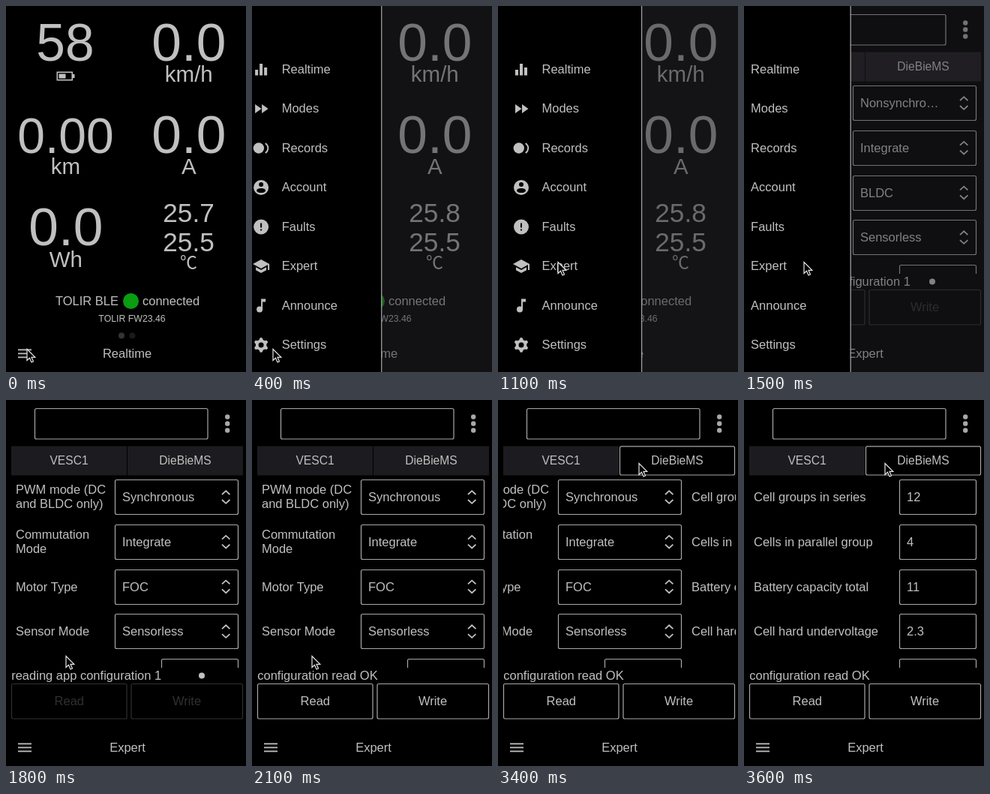
An HTML page with a canvas that plays this animation: 320 by 488 pixels, repeating every 5 s.

```html
<!DOCTYPE html>
<html lang="en">
<head>
<meta charset="utf-8">
<style>
html, body { margin: 0; width: 100%; height: 100%; overflow: hidden; background: #000; }
canvas { display: block; }
</style>
</head>
<body>
<canvas id="stage" width="320" height="488"></canvas>
<script>
const ctx = document.getElementById('stage').getContext('2d');
const LOOP = 5000, STEP = 100;
const INK = '#c0c0c0', LINE = '#a8a8a8', TAB = '#1c1b1f', OFF = '#303030';
const SANS = '"Liberation Sans", Arial, sans-serif';
const DRAWER_W = 191, PAGE_W = 310, ROW = 59.7;

const clamp = v => Math.min(1, Math.max(0, v));
const progress = (t, start, length) => clamp((t - start) / length);
const inOut = u => u < 0.5 ? 2 * u * u : 1 - 2 * (1 - u) ** 2;

function text(str, x, y, size = 16.5, align = 'left', color = INK, family = SANS) {
  ctx.font = `${size}px ${family}`;
  ctx.textAlign = align;
  ctx.fillStyle = color;
  ctx.fillText(str, x, Math.round(y));
}

function rect(x, y, w, h, color) {
  ctx.fillStyle = color;
  ctx.fillRect(x, y, w, h);
}

function disc(x, y, r, color = INK) {
  ctx.fillStyle = color;
  ctx.beginPath();
  ctx.arc(x, y, r, 0, Math.PI * 2);
  ctx.fill();
}

function frame(x, y, w, h, color = LINE) {
  ctx.strokeStyle = color;
  ctx.lineWidth = 1.2;
  ctx.beginPath();
  ctx.roundRect(x, y, w, h, 2);
  ctx.stroke();
}

function polyline(points, width = 2, color = INK) {
  ctx.strokeStyle = color;
  ctx.lineWidth = width;
  ctx.beginPath();
  points.forEach(([x, y]) => ctx.lineTo(x, y));
  ctx.stroke();
}

function footer(title, x) {
  for (const y of [457.5, 462.5, 467.5]) rect(16, y, 18, 1.8, INK);
  text(title, x, 469, 16.5, 'center');
}

function battery() {
  ctx.strokeStyle = INK;
  ctx.lineWidth = 1.6;
  ctx.strokeRect(68.3, 88.3, 20, 10.4);
  rect(70.5, 90.5, 9, 6, INK);
  rect(89, 91, 2.5, 5, INK);
}

function drawRealtime(t) {
  // value, unit, centre x, row, value size
  const gauges = [
    ['58', '', 79, 0, 69.5], ['0.0', 'km/h', 243.8, 0, 71.3],
    ['0.00', 'km', 79.5, 1, 66], ['0.0', 'A', 243.8, 1, 71.3],
    ['0.0', 'Wh', 79.8, 2, 71.3]
  ];
  for (const [value, unit, x, row, size] of gauges) {
    text(value, x, 73 + row * 123, size, 'center');
    text(unit, x, 101 + row * 123.3, 29.5, 'center');
  }
  battery();
  text(t < 300 ? '25.7' : '25.8', 243.5, 288, 35.2, 'center');
  text('25.5', 243.5, 327, 35.2, 'center');
  text('℃', 243.5, 350, 23, 'center', INK, '"Noto Sans CJK SC", "Noto Sans CJK JP", sans-serif');
  text('TOLIR BLE', 150, 399, 16.5, 'right');
  disc(166.5, 393.5, 10.5, '#0a9c12');
  text('connected', 182, 399);
  text('TOLIR FW23.46', 168, 421, 12.3, 'center');
  disc(154, 439.5, 4, '#343434');
  disc(168.5, 439.5, 4, '#1a1a1a');
  footer('Realtime', 161.5);
}

function rowLabel(lines, cy) {
  const y = cy + (lines.length > 1 ? -4.6 : 5.3);
  lines.forEach((line, i) => text(line, 13, y + i * 19));
}

function rowBox(x, cy, value) {
  frame(x, Math.round(cy - 23.7) + 0.5, 309.5 - x, 46);
  text(value, x + 9.5, cy + 5.3);
}

function motorPage(loaded) {
  const rows = [
    [['PWM mode (DC', 'and BLDC only)'], loaded ? 'Synchronous' : 'Nonsynchro…'],
    [['Commutation', 'Mode'], 'Integrate'],
    [['Motor Type'], loaded ? 'FOC' : 'BLDC'],
    [['Sensor Mode'], 'Sensorless']
  ];
  rows.forEach(([label, value], i) => {
    const cy = 130 + i * ROW, mid = cy - 0.5;
    rowLabel(label, cy);
    rowBox(145.5, cy, value);
    for (const d of [-1, 1])
      polyline([[288, mid + d * 3.5], [293.2, mid + d * 8.3], [298.4, mid + d * 3.5]], 1.8);
  });
  rowBox(207.5, 130 + 4 * ROW, '');
}

function cellPage() {
  const rows = [
    ['Cell groups in series', '12'], ['Cells in parallel group', '4'],
    ['Battery capacity total', '11'], ['Cell hard undervoltage', '2.3'], ['', '']
  ];
  rows.forEach(([label, value], i) => {
    const cy = 130 + i * ROW;
    rowLabel([label], cy);
    rowBox(207.5, cy, value);
  });
}

function drawExpert(t) {
  const loaded = t >= 1700, ready = t >= 2100;
  const shift = Math.round(PAGE_W * inOut(progress(t, 3319, 250)));

  frame(38.5, 11.5, 230.5, 40.5);
  for (const y of [22.5, 31.5, 40.5]) disc(295.2, y, 3.2, LINE);

  rect(7, 61.5, 154, 39, TAB);
  if (t >= 3400) frame(162.5, 61.8, 153, 38.2);
  else rect(162, 61.5, 154, 39, TAB);
  text('VESC1', 84, 86, 15.6, 'center');
  text('DieBieMS', 239, 86, 15.6, 'center');

  ctx.save();
  ctx.beginPath();
  ctx.rect(7, 102, PAGE_W, 255);
  ctx.clip();
  ctx.translate(-shift, 0);
  if (shift < PAGE_W) motorPage(loaded);
  ctx.translate(PAGE_W, 0);
  if (shift > 0) cellPage();
  ctx.restore();

  const status = ready ? 'configuration read OK'
    : `reading ${loaded ? 'app' : 'motor'} configuration 1`;
  text(status, 7.2, 373);
  if (!ready) disc(251 + (t - 1500) / 30, 367.5, 4);

  frame(7.5, 378.5, 153.5, 46.5, ready ? LINE : OFF);
  frame(167, 378.5, 148.5, 46.5, ready ? LINE : OFF);
  text('Read', 84.3, 407, 16.5, 'center', ready ? INK : OFF);
  text('Write', 241, 407, 16.5, 'center', ready ? INK : OFF);
  footer('Expert', 162);
}

function fillPath(d) {
  ctx.fillStyle = INK;
  ctx.fill(new Path2D(d));
}

function gear() {
  ctx.fillStyle = INK;
  ctx.beginPath();
  for (let i = 0; i < 24; i++) {
    const a = (i + 0.5) * Math.PI / 12;
    const r = i % 4 === 1 || i % 4 === 2 ? 9.8 : 7.2;
    ctx.lineTo(12 + r * Math.cos(a), 12 + r * Math.sin(a));
  }
  ctx.fill();
  disc(12, 12, 3.5, '#000');
}

// Menu entries; icons are drawn in a 24 px box
const MENU = [
  ['Realtime', () => {
    rect(4, 12.5, 4, 7.5, INK);
    rect(10, 4.5, 4, 15.5, INK);
    rect(16, 9.5, 4, 10.5, INK);
  }],
  ['Modes', () => fillPath('M4 18l8.5-6L4 6zM13 6v12l8.5-6z')],
  ['Records', () => {
    disc(8.8, 12, 7.2);
    ctx.strokeStyle = INK;
    ctx.lineWidth = 2;
    ctx.beginPath();
    ctx.arc(14, 12, 7.3, -1.05, 1.05);
    ctx.stroke();
  }],
  ['Account', () => {
    disc(12, 12, 10);
    disc(12, 8, 3, '#000');
    ctx.beginPath();
    ctx.ellipse(12, 16, 6, 3.1, 0, 0, Math.PI * 2);
    ctx.fill();
  }],
  ['Faults', () => {
    disc(12, 12, 10);
    rect(11, 7, 2, 6, '#000');
    rect(11, 15, 2, 2, '#000');
  }],
  ['Expert', () => fillPath('M5 13.2v4L12 21l7-3.8v-4L12 17zM12 3L1 9l11 6 9-4.9V17h2V9z')],
  ['Announce', () => {
    fillPath('M12 3h6v4h-4v10h-2z');
    disc(10, 17, 4);
  }],
  ['Settings', gear]
];

function drawDrawer(open, pressed) {
  rect(0, 0, 320, 488, `rgba(38, 35, 41, ${0.55 * open})`);
  ctx.save();
  ctx.translate(-DRAWER_W * (1 - open), 0);
  rect(0, 0, DRAWER_W, 488, '#000');
  rect(DRAWER_W, 0, 1.2, 488, LINE);
  if (pressed) rect(0, 323, DRAWER_W, 48, '#201f23');
  MENU.forEach(([label, icon], i) => {
    const cy = 84.5 + i * 52.5;
    text(label, 58.5, cy + 5.2);
    ctx.save();
    ctx.translate(19, cy - 12);
    icon();
    ctx.restore();
  });
  ctx.restore();
}

// Pointer route: time, x, y
const ROUTE = [
  [600, 27.5, 457], [700, 32, 446], [850, 56, 395], [1000, 77, 348], [1100, 79.5, 341],
  [2400, 79.5, 341], [2500, 44, 348], [2600, 95, 285], [2700, 153, 200],
  [2800, 178, 145], [2900, 186, 115], [3000, 187.5, 101], [3200, 187.5, 84]
];

function pointerAt(t) {
  const i = ROUTE.findIndex(p => p[0] > t);
  if (i === 0) return ROUTE[0].slice(1);
  if (i < 0) return ROUTE[ROUTE.length - 1].slice(1);
  const [t0, x0, y0] = ROUTE[i - 1], [t1, x1, y1] = ROUTE[i];
  const u = (t - t0) / (t1 - t0);
  return [x0 + (x1 - x0) * u, y0 + (y1 - y0) * u];
}

const ARROW = new Path2D('M.5 .5V15.5L4 12.2L6.5 18L9 17L6.5 11.3H11.3Z');

function drawPointer(t) {
  ctx.save();
  ctx.translate(...pointerAt(t));
  ctx.fillStyle = '#000';
  ctx.fill(ARROW);
  ctx.strokeStyle = '#e4e4e4';
  ctx.lineWidth = 1.2;
  ctx.stroke(ARROW);
  ctx.restore();
}

function draw(t) {
  rect(0, 0, 320, 488, '#000');
  if (t < 1500) drawRealtime(t);
  else drawExpert(t);
  const open = t < 1400
    ? inOut(progress(t, 50, 450))
    : 1 - inOut(progress(t, 1400, 278));
  if (open > 0) drawDrawer(open, t >= 1300 && t < 1500);
  drawPointer(t);
}

function tick(now) {
  draw(Math.floor(now % LOOP / STEP) * STEP);
  requestAnimationFrame(tick);
}
tick(performance.now());
</script>
</body>
</html>
```
